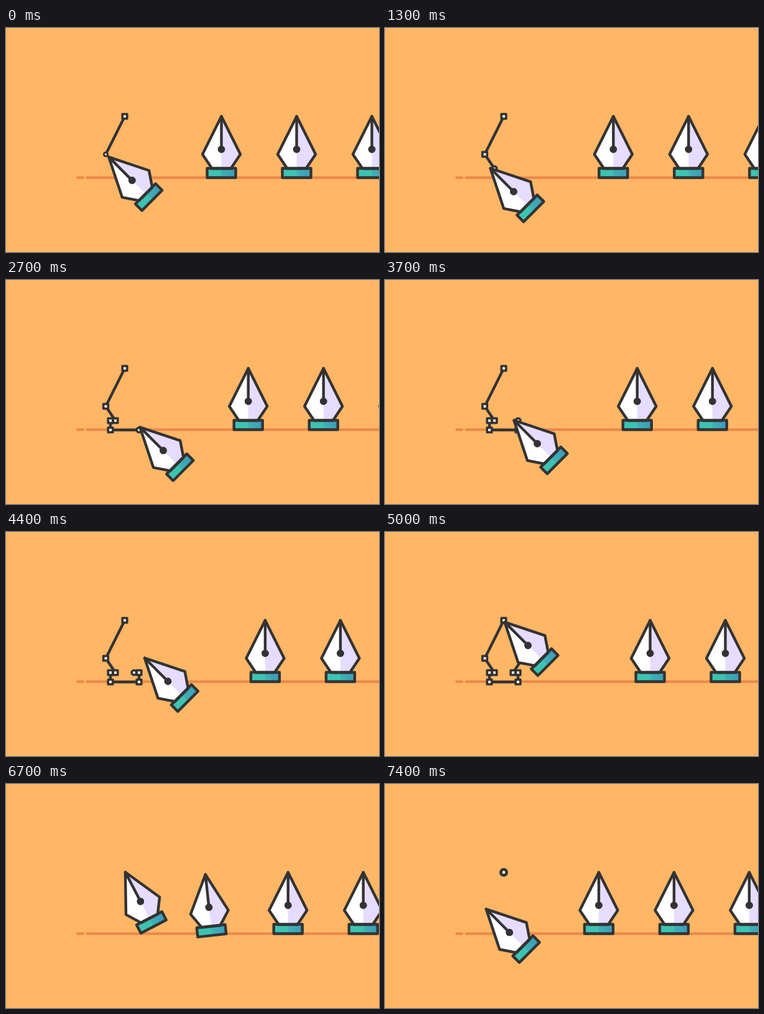
Write an HTML page with a canvas that moves like this. It is 600 px wide and 360 px high and loops after 7.5 s.

```html
<!DOCTYPE html>
<html lang="en">
<head>
<meta charset="utf-8">
<title>Pen tool assembly line</title>
<style>
  html, body { margin: 0; width: 100%; height: 100%; overflow: hidden; background: #ffb665; }
  canvas { display: block; width: 600px; height: 360px; }
</style>
</head>
<body>
<canvas id="stage" width="600" height="360"></canvas>
<script>
const ctx = document.getElementById('stage').getContext('2d');
const LOOP = 7500, GAP = 121, FLOOR = 240.5, INK = '#333333';

// A pen's life spans two loops: it is drawn, draws the next pen, then joins the row.
const BORN = 6400, TURN = 6500, LEAVE = 12480, JOIN = 14720;
const FADE_IN = 13200, FADE_OUT = 13900;
const MOVE = 450;
const HOME = [191, 142];

const nodes = [HOME, [160.5, 203], [176, 226], [168, 226], [168, 241],
  [214, 241], [214, 226], [206, 226], [221.5, 203]];

const clamp = v => Math.max(0, Math.min(1, v));
const span = (t, from, length) => clamp((t - from) / length);
const smooth = u => u * u * (3 - 2 * u);
const easeOut = u => 1 - (1 - u) ** 2;
const mix = (a, b, u) => a + (b - a) * u;

// The clicks come slightly faster towards the end; click 9 closes the path.
const clickTime = i => i ? 7450 + 720 * (i - 1) - 12 * (i - 1) ** 2 : 7020;
const clickCount = u => {
  let n = 0;
  while (n <= nodes.length && u >= clickTime(n)) n++;
  return n;
};
const rowX = t => 346.5 + 0.016 * t;

function trace(points, close) {
  ctx.beginPath();
  points.forEach(([x, y]) => ctx.lineTo(x, y));
  if (close) ctx.closePath();
}

function fill(points, color) {
  trace(points, true);
  ctx.fillStyle = color;
  ctx.fill();
}

function stroke(points, close) {
  trace(points, close);
  ctx.strokeStyle = INK;
  ctx.lineWidth = 4.4;
  ctx.stroke();
}

function disc(r) {
  ctx.beginPath();
  ctx.arc(0, 53, r, 0, 7);
  ctx.fillStyle = INK;
  ctx.fill();
}

const box = (x, y, w, h) => [[x, y], [x + w, y], [x + w, y + h], [x, y + h]];
const nib = [[0, 0], [30.5, 61], [15, 84], [-15, 84], [-30.5, 61]];
const nibLight = [[0, 0], [0, 84], [-15, 84], [-30.5, 61]];
const collar = box(-23, 83.5, 46, 15);
const collarDark = box(0, 83.5, 23, 15);
const collarShade = ctx.createLinearGradient(0, 0, 23, 0);
collarShade.addColorStop(0, '#3eb2b5');
collarShade.addColorStop(1, '#3c9cba');

// Pen with its tip at x, y, turned counter-clockwise.
// While it fades in, lines come first, then flat colour, then the light and shade.
function pen(x, y, degrees = 0, fade = 1) {
  const lines = fade ** 0.5, flat = fade ** 1.4, detail = fade ** 6;
  ctx.save();
  ctx.translate(x, y);
  ctx.rotate(-degrees * Math.PI / 180);
  ctx.globalAlpha = flat;
  fill(nib, '#e6dcff');
  fill(collar, '#3cc4b2');
  ctx.globalAlpha = detail;
  fill(nibLight, '#ffffff');
  fill(collarDark, collarShade);
  ctx.globalAlpha = lines;
  stroke(nib, true);
  stroke(collar, true);
  stroke([[0, 0], [0, 48]]);
  disc(2.8);
  ctx.beginPath();
  ctx.arc(0, 53, 4.8, 0, 7);
  ctx.lineWidth = 2;
  ctx.stroke();
  ctx.globalAlpha = detail;
  disc(5.8);
  ctx.restore();
}

function blob([x, y], r, corner, color) {
  ctx.beginPath();
  ctx.roundRect(x - r, y - r, 2 * r, 2 * r, corner);
  ctx.fillStyle = color;
  ctx.fill();
}

// An anchor pops in round and turns square once the next one is clicked.
function anchor(i, u, fade) {
  const age = u - clickTime(i);
  const r = (8 * span(age, 0, 90) - 2.4 * span(age, 330, 120)) * (1 - fade * fade);
  if (r <= 0) return;
  const square = span(u, clickTime(i + 1), 60);
  const inner = r * 0.35;
  blob(nodes[i], r, r * (1 - 0.72 * square), INK);
  ctx.globalAlpha = 1 - fade;
  blob(nodes[i], inner, inner * (1 - 0.85 * square), '#f2fbfb');
  ctx.globalAlpha = 1;
}

function drawing(u) {
  const count = clickCount(u);
  if (!count || u >= FADE_OUT) return;
  stroke(nodes.slice(0, count), count > nodes.length);
  const fade = span(u, FADE_IN, FADE_OUT - FADE_IN);
  if (fade) pen(...HOME, 0, fade);
  nodes.forEach((n, i) => anchor(i, u, fade));
}

// After each click the tip glides to the next anchor; at last it swings over to the row.
function hand(u) {
  if (u < BORN || u >= JOIN) return;
  const count = clickCount(u);
  const from = nodes[Math.max(0, count - 1) % nodes.length];
  const to = nodes[count % nodes.length];
  const glide = count && count <= nodes.length ? easeOut(span(u, clickTime(count - 1), MOVE)) : 0;
  const grip = smooth(span(u, TURN, 350));
  const out = span(u, LEAVE, JOIN - LEAVE), swing = smooth(out);
  const x = mix(from[0], to[0], glide) + 1.5 * grip;
  const y = mix(from[1], to[1], glide) - 0.5 * grip;
  const dip = 368 * out * (1 - out) ** 3;
  pen(mix(x, rowX(JOIN - LOOP) - GAP, swing), mix(y, HOME[1], swing) + dip, 45 * grip * (1 - swing));
}

function ground() {
  ctx.strokeStyle = '#e98748';
  ctx.lineWidth = 4;
  ctx.beginPath();
  ctx.moveTo(115, FLOOR);
  ctx.lineTo(124, FLOOR);
  ctx.moveTo(130.5, FLOOR);
  ctx.lineTo(610, FLOOR);
  ctx.stroke();
}

function render(t) {
  ctx.lineCap = ctx.lineJoin = 'round';
  ctx.fillStyle = '#ffb665';
  ctx.fillRect(0, 0, 600, 360);
  ground();
  const first = t + LOOP >= JOIN ? -1 : 0;
  for (let k = first; k < 3; k++) pen(rowX(t) + GAP * k, HOME[1]);
  drawing(t < BORN ? t + LOOP : t);
  hand(t);
  hand(t + LOOP);
}

const start = performance.now();
function tick() {
  render((performance.now() - start) % LOOP);
  requestAnimationFrame(tick);
}
tick();
</script>
</body>
</html>
```
